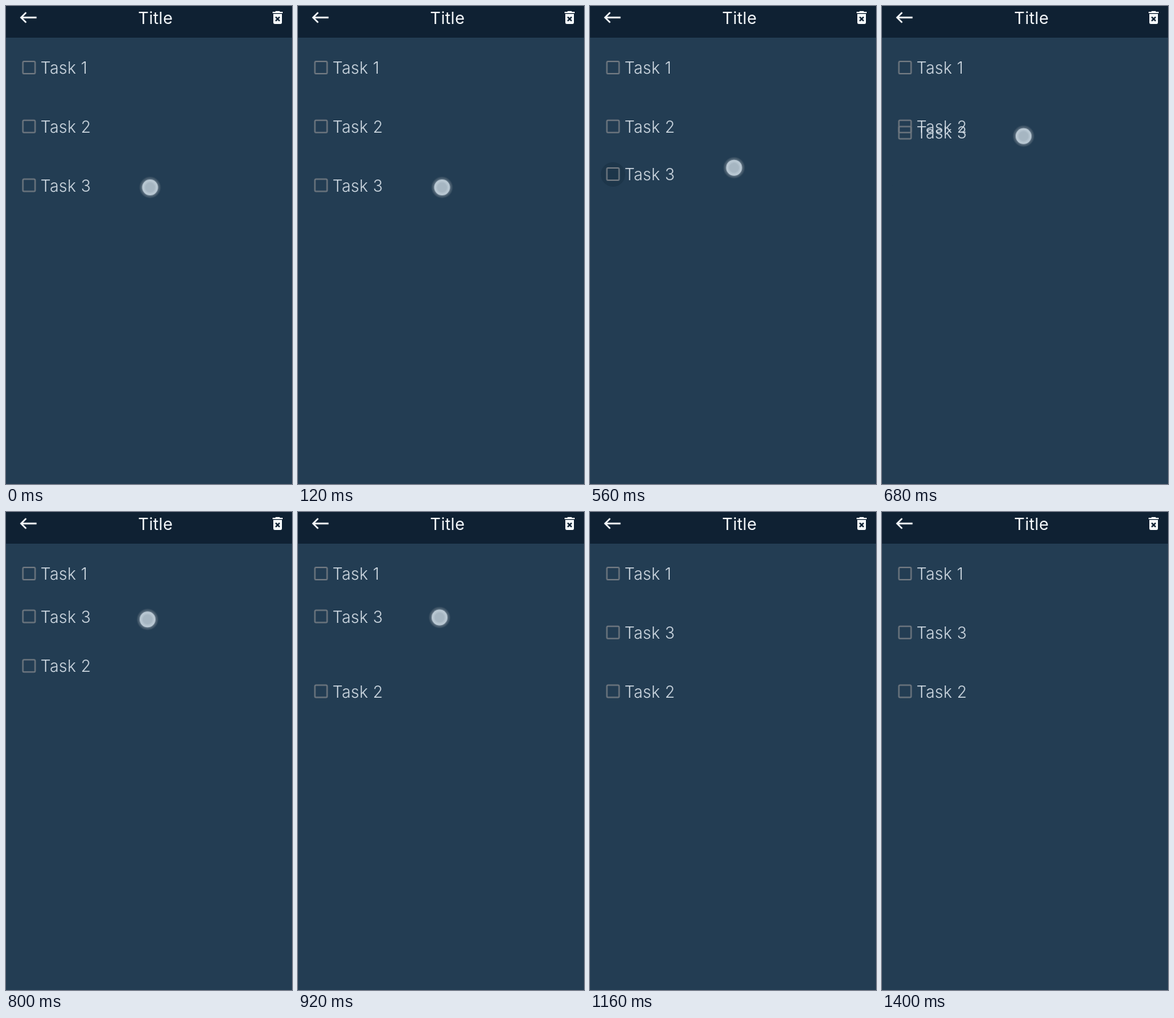
An HTML page for the animation above (1480 ms loop, 398x664 px).

```html
<!DOCTYPE html>
<html lang="en">
<head>
<meta charset="utf-8">
<title>Reorder tasks</title>
<style>
  html, body { margin: 0; width: 100%; height: 100%; overflow: hidden; background: #233d53; }
  svg { display: block; width: 100%; height: 100%; }
  text { font-family: Inter, sans-serif; font-weight: 300; font-size: 22.5px; letter-spacing: .3px; fill: #d0dae3; }
  .title { font-weight: 400; font-size: 23px; fill: #f5f9fc; text-anchor: middle; }
  .box { fill: none; stroke: #6d767f; stroke-width: 2; }
</style>
</head>
<body>
<svg viewBox="0 0 398 664">
  <defs>
    <radialGradient id="halo">
      <stop offset=".72" stop-color="#8796a3" stop-opacity=".7"/>
      <stop offset="1" stop-color="#66747f" stop-opacity=".15"/>
    </radialGradient>
    <radialGradient id="disc">
      <stop offset=".55" stop-color="#a6b6c2"/>
      <stop offset=".8" stop-color="#b8c7d2"/>
    </radialGradient>
  </defs>
  <rect width="398" height="664" fill="#233d53"/>
  <rect width="398" height="44" fill="#0f2133"/>
  <path d="M42.500 16H21M28 9l-7 7 7 7" fill="none" stroke="#f5f9fc" stroke-width="2.300"/>
  <text class="title" x="208" y="24.500">Title</text>
  <path transform="translate(366 4)" fill="#f5f9fc" fill-rule="evenodd"
    d="M6 19q0 2 2 2h8q2 0 2-2V7H6zM8.500 11.900l1.400-1.400 2.100 2.100 2.100-2.100 1.400 1.400-2.100 2.100 2.100 2.100-1.400 1.400-2.100-2.100-2.100 2.100-1.400-1.400 2.100-2.100zM15.500 4l-1-1h-5l-1 1H5v2h14V4z"/>
  <g id="list"></g>
  <g id="touch">
    <circle r="15" fill="url(#halo)"/>
    <circle r="11" fill="url(#disc)"/>
  </g>
</svg>
<script>
const LOOP = 1480, STEP = 40;
const rowY = i => 86 + 81.75 * i;
const LIFTED = 145.5;

// Smooth 0 to 1 ramp between two times.
function ease(t, from, to) {
  const u = Math.min(1, Math.max(0, (t - from) / (to - from)));
  return u * u * (3 - 2 * u);
}
const mix = (a, b, u) => a + (b - a) * u;

function move(el, x, y) {
  el.setAttribute('transform', `translate(${x} ${y})`);
}

const list = document.getElementById('list');
const touch = document.getElementById('touch');
list.innerHTML = [0, 1, 2].map(i => `
  <g transform="translate(0 ${rowY(i)})">
    <circle class="ripple" cx="32" r="17" fill="#0d2030" opacity="0"/>
    <rect class="box" x="23.500" y="-9" width="17" height="17" rx="1.500"/>
    <text x="48" y="8">Task ${i + 1}</text>
  </g>`).join('');
const [, second, third] = list.children;
const ripple = third.querySelector('.ripple');

function draw(now) {
  const t = Math.floor(now % LOOP / STEP) * STEP;

  // The third task is dragged up, then drops into the second row.
  const dragged = mix(rowY(2), LIFTED, ease(t, 486, 790));
  move(third, 0, mix(dragged, rowY(1), ease(t, 960, 1160)));
  move(second, 0, mix(rowY(1), rowY(2), ease(t, 680, 900)));

  move(touch, mix(200.5, 197, ease(t, 560, 680)), mix(252, 146.5, ease(t, 420, 840)));
  touch.setAttribute('opacity', 1 - ease(t, 960, 1040));
  ripple.setAttribute('opacity', .25 * (ease(t, 240, 320) - ease(t, 560, 680)));
}

const start = performance.now();
function tick() {
  draw(performance.now() - start);
  requestAnimationFrame(tick);
}
tick();
</script>
</body>
</html>
```
